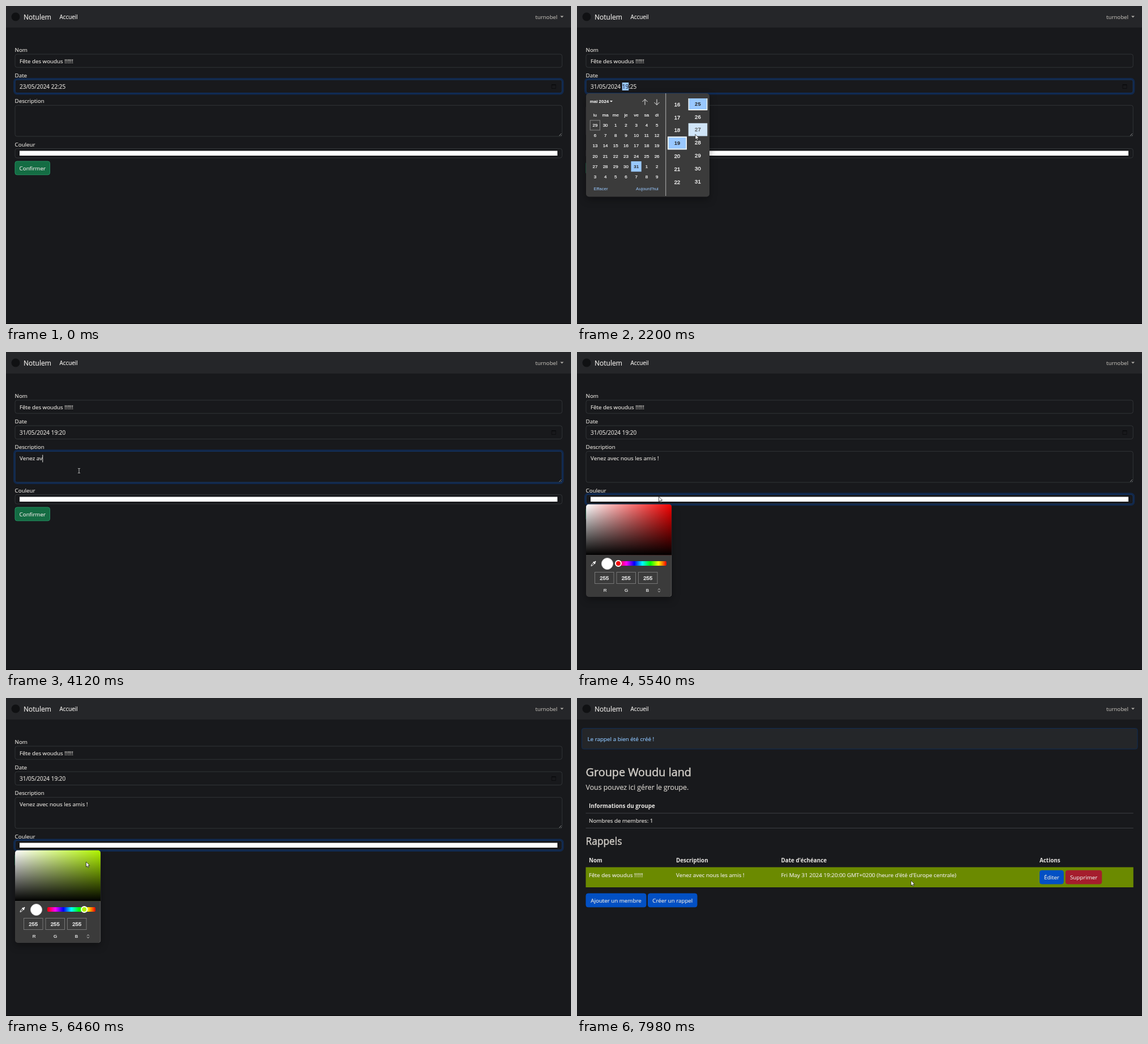
An HTML page that plays this animation: 998x561 px, repeating every 8000 ms.

```html
<!DOCTYPE html>
<html lang="fr">
<head>
<meta charset="utf-8">
<title>Rappels</title>
<style>
  html, body { margin: 0; width: 100%; height: 100%; overflow: hidden; background: #18191c; }
  /* Laid out on a grid four times finer, so that edges can fall between pixels */
  #stage { position: relative; width: 998px; height: 561px; overflow: hidden; background: #18191c;
    zoom: 4; transform: scale(.25); transform-origin: 0 0;
    color: #e2dfda; font: 9.75px/16px "Open Sans", "Noto Sans", sans-serif; -webkit-text-stroke: .18px; }
  #stage div, #stage svg { position: absolute; box-sizing: border-box; }
  .t { white-space: pre; }
  .c { transform: translateX(-50%); }
  .b { font-weight: 700; color: #e8e6e3; -webkit-text-stroke: 0; }
  .h { color: #d0ccc6; -webkit-text-stroke: .5px; }
  .field { border: 1px solid #313437; border-radius: 4px; }
  .ring { border: 1px solid #0d3268; border-radius: 4px; box-shadow: 0 0 0 2.5px #11284c; opacity: 0; }
  .btn { border-radius: 4px; text-align: center; line-height: 22.7px; color: #e8e6e3; }
  .pop { background: #3b3b3b; border-radius: 5px; box-shadow: 0 5px 14px rgba(0,0,0,.35);
    color: #fff; font-family: "Liberation Sans", Arial, sans-serif; }
  .pop .cell { width: 18.2px; height: 18.2px; line-height: 18.2px; text-align: center; font-size: 8px; }
  .col { overflow: hidden; width: 34px; height: 165px; }
  .col .item { width: 34px; height: 22.8px; line-height: 22.8px; text-align: center; font-size: 9.5px;
    -webkit-text-stroke: .3px; }
  .pop .over { background: #d0e5f8; color: #555; }
  .pop .on { background: #99c8ff; color: #262626; font-weight: 700; -webkit-text-stroke: 0; }
  .col .on { border: 1.5px solid #fff; line-height: 19.8px; }
  .link { color: #99c8ff; -webkit-text-stroke: 0; }
  .num { border: 1px solid #777; width: 34.5px; height: 21px; line-height: 19px; text-align: center;
    font-size: 9.5px; -webkit-text-stroke: .3px; }
  #hour { display: inline-block; line-height: 14px; }
  #hour.mark { background: #99c8ff; color: #26303c; }
  #caret { position: absolute; top: 2px; width: 1px; height: 13px; background: #e8e6e3; }
</style>
</head>
<body>
<div id="stage"></div>
<script>
const LOOP = 8000, ROW = 22.8, CELL = 18.2;
const PICK = [134, 173, 0];
const pad = n => String(n).padStart(2, '0');
const $ = id => document.getElementById(id);

// Markup helpers: a box, a line of text centred on y, a button and a form field
const box = (x, y, w, h, css = '', cls = '', body = '', id = '') =>
  `<div ${id && `id="${id}"`} class="${cls}" style="left:${x}px;top:${y}px;width:${w}px;height:${h}px;${css}">${body}</div>`;
const text = (x, y, s, size = 9.75, cls = '', css = '') =>
  `<div class="t ${cls}" style="left:${x}px;top:${y - 8}px;font-size:${size}px;${css}">${s}</div>`;
const btn = (x, y, w, s, bg, edge = bg) =>
  box(x, y, w, 24.7, `background:${bg};border:1px solid ${edge}`, 'btn', s);
const area = (name, y, h) =>
  box(15.6, y, 967.2, h, '', 'field') + box(15.6, y, 967.2, h, '', 'ring', '', name + 'Ring');

const nav = box(0, 0, 998, 38, 'background:#252629') +
  box(9.5, 11.5, 15, 15, 'background:#101113;border-radius:50%') +
  text(31, 19, 'Notulem', 12, '', 'color:#f0eeeb') + text(94.5, 19, 'Accueil', 9.9, '', 'color:#f0eeeb') +
  text(935, 19, 'turnobel', 9.7, '', 'color:#b0ada8') +
  box(979, 17.5, 0, 0, 'border:3px solid transparent;border-top-color:#b0ada8;border-bottom:0');

const form = text(15.6, 77, 'Nom') + area('name', 84.4, 24.4) + text(24, 97, 'Fête des woudus !!!!!!') +
  text(15.6, 122, 'Date') + area('date', 129.5, 24.5) +
  text(24, 142, '<span id="day"></span>/05/2024 <span id="hour"></span>:<span id="min"></span>', 10) +
  box(963.5, 138, 8, 8, 'border:1px solid #0c0d0f;border-top-width:2px;border-radius:1px') +
  text(15.6, 167, 'Description') + area('desc', 174.8, 55.6) +
  text(24, 187.5, '<span id="typed"></span><span id="caret"></span>', 9.85) +
  `<svg style="left:975px;top:223px" width="7" height="7"><path d="M2 6L6 2M5 6L6 5" stroke="#aaa" stroke-width=".8"/></svg>` +
  text(15.6, 244, 'Couleur') + area('color', 251, 17.5) +
  box(24, 255.5, 950, 8.5, '', '', '', 'bar') + btn(15.6, 273.5, 62.3, 'Confirmer', '#146c43', '#239262');

const arrow = (x, flip) => `<svg style="left:${x}px;top:9.5px${flip ? ';transform:scaleY(-1)' : ''}" width="11" height="12">
  <path d="M5.5 11V1M1 5.5L5.5 1L10 5.5" fill="none" stroke="#eee"/></svg>`;

const days = Array.from({ length: 42 }, (_, i) => ({
  n: i < 2 ? 29 + i : i < 33 ? i - 1 : i - 32,
  x: 6.8 + i % 7 * CELL, y: 47.2 + Math.floor(i / 7) * CELL
}));
const dayCells = ['lu', 'ma', 'me', 'je', 've', 'sa', 'di']
  .map((d, i) => box(6.8 + i * CELL, 29, CELL, CELL, '', 'cell', d)).join('') +
  days.map((d, i) => box(d.x, d.y, CELL, CELL, i ? '' : 'outline:1px solid #858585;outline-offset:-1px', 'cell day', d.n)).join('');
const column = (id, x, from, to, wrap) => box(x, 9, 34, 165, '', 'col',
  Array.from({ length: to - from }, (_, i) => `<div class="item">${pad((from + i) % wrap)}</div>`).join(''), id);

const calendar = box(16, 154, 218, 182.5, '', 'pop',
  text(6.8, 14, 'mai 2024', 7.9, '', 'font-weight:700;-webkit-text-stroke:0') +
  box(42, 13, 0, 0, 'border:2.5px solid transparent;border-top-color:#fff;border-bottom:0') +
  arrow(98.5) + arrow(119.5, true) + dayCells +
  text(26, 168, 'Effacer', 8, 'c link') + text(108, 168, "Aujourd'hui", 8, 'c link') +
  box(140.3, 0, 1, 181, 'background:#b5b5b5') +
  column('hours', 144, 12, 32, 24) + column('mins', 180.4, 12, 42, 60));

const hueBar = 'linear-gradient(90deg,#f00,#f0f,#00f,#0ff,#0f0,#ff0,#f00)';
const picker = box(16, 268.5, 151.5, 163.5, 'border-right:1px solid #666', 'pop',
  box(0, 0, 151, 90, 'border-radius:5px 5px 0 0', '', '', 'shade') +
  `<svg style="left:8px;top:99px" width="11" height="11"><path d="M1 10L1.6 7.6 6 3.2 7.6 4.8 3.2 9.2Z" fill="none" stroke="#fff"/>
   <path d="M4.8 2.8L8 6M6.6 4.2L9 1.8" stroke="#fff" stroke-width="2"/></svg>` +
  box(27, 94.5, 21, 21, 'border-radius:50%;border:1px solid #ddd', '', '', 'swatch') +
  box(57, 100.5, 85, 8, `border-radius:2px;background:${hueBar}`) +
  box(0, 98.5, 12, 12, 'border-radius:50%;border:2px solid #fff', '', '', 'knob') +
  ['R', 'G', 'B'].map((c, i) => box(15 + i * 38.5, 119.5, 34.5, 21, '', 'num') +
    text(33.7 + i * 37.4, 151.5, c, 8, 'c')).join('') +
  `<svg style="left:126px;top:148px" width="6" height="8"><path d="M1.2 3L3 1L4.8 3M1.2 5L3 7L4.8 5" fill="none" stroke="#ddd" stroke-width=".9"/></svg>`);

const group = box(8, 53, 982.5, 37.5, 'background:#242629;border:1px solid #0f2c54;border-radius:4px') +
  text(18.5, 72, 'Le rappel a bien été créé !', 9.85, '', 'color:#8cc2fa') +
  text(15.6, 130, 'Groupe Woudu land', 19.8, 'h') + text(15.6, 157, 'Vous pouvez ici gérer le groupe.', 12.3, '', 'color:#d6d2cc') +
  text(21, 190, 'Informations du groupe', 9.85, 'b') + box(15.6, 202.7, 967.2, .75, 'background:#4a4d50') +
  text(21, 216.5, 'Nombres de membres: 1', 9.8) + box(15.6, 229.2, 967.2, .75, 'background:#4a4d50') +
  text(15.6, 252, 'Rappels', 17.3, 'h') +
  [[21, 'Nom'], [175, 'Description'], [360.5, "Date d'échéance"], [817, 'Actions']]
    .map(([x, s]) => text(x, 286, s, 9.85, 'b')).join('') +
  box(15.6, 298.4, 967.2, 35.6, 'background:#6b8a00') +
  [[21, 'Fête des woudus !!!!!!'], [175, 'Venez avec nous les amis !'],
    [360.5, "Fri May 31 2024 19:20:00 GMT+0200 (heure d'été d'Europe centrale)"]]
    .map(([x, s]) => text(x, 312.3, s, 9.85, '', 'color:#edebe7')).join('') +
  btn(817, 303.8, 42.7, 'Éditer', '#0250c4') + btn(862.8, 303.8, 64.5, 'Supprimer', '#a51d2d') +
  btn(15.6, 344.5, 106.8, 'Ajouter un membre', '#0250c4') + btn(125, 344.5, 87.6, 'Créer un rappel', '#0250c4');

const cursors = `<svg id="arrow" width="10" height="13" style="overflow:visible"><path d="M0 0V9L2 7.2 3.4 10.3 4.8 9.7 3.5 6.7H6.4Z" fill="#fff" stroke="#111" stroke-width=".7"/></svg>
  <svg id="beam" width="10" height="10" style="overflow:visible"><path d="M-2-4H-.5L0-3.5.5-4H2M0-3.5V3.5M-2 4H-.5L0 3.5.5 4H2" fill="none" stroke="#ccc" stroke-width=".9"/></svg>`;

$('stage').innerHTML = nav + `<div id="form">${form}</div><div id="calBox">${calendar}</div><div id="pickBox">${picker}</div>` +
  `<div id="group">${group}</div>` + cursors + box(0, 560, 998, 1, 'background:#09090a');

const dayEls = [...document.querySelectorAll('.day')];
const numEls = [...document.querySelectorAll('.num')];

// Pointer path: time, x, y
const PATH = [
  [180, 960, 148], [280, 967, 142], [320, 967, 142], [840, 106, 284], [960, 106, 284],
  [1260, 172.5, 262.5], [1400, 172.5, 262.5], [1860, 175, 247], [2060, 175, 243],
  [2200, 209, 226.5], [2480, 211, 221], [2600, 211, 221], [2780, 262, 214], [2860, 262, 214],
  [3240, 129, 209.5], [5300, 129, 209.5], [5400, 144.5, 255], [5600, 144.5, 255],
  [5760, 73, 371], [5800, 73, 371], [6160, 138.3, 371], [6220, 138.3, 371],
  [6460, 141.5, 289], [6640, 166, 297], [6720, 166, 297], [6880, 186, 334], [6940, 186, 334],
  [7200, 52, 284], [7420, 52, 284], [7960, 590, 322]
];
// Typing bursts: start, end, characters
const PHRASE = 'Venez avec nous les amis !';
const BURSTS = [[3420, 3800, 5], [4000, 4255, 7], [4430, 4730, 10], [4910, 5130, 4]];

const clamp = (v, a = 0, b = 1) => Math.min(b, Math.max(a, v));
const ramp = (t, a, b) => { const k = clamp((t - a) / (b - a)); return k * k * (3 - 2 * k); };
const mix = (a, b, k) => a + (b - a) * k;
const show = (id, on) => { $(id).style.display = on ? '' : 'none'; };

function pointer(t) {
  const i = PATH.findIndex(p => p[0] > t);
  if (i < 1) return i ? PATH[PATH.length - 1].slice(1) : [-50, -50];
  const [a, b] = [PATH[i - 1], PATH[i]], k = ramp(t, a[0], b[0]);
  return [mix(a[1], b[1], k), mix(a[2], b[2], k)];
}

function typing(t) {
  let n = 0, last = 2800;
  for (const [a, b, count] of BURSTS) {
    if (t < a) break;
    const step = (b - a) / (count - 1), k = Math.min(count - 1, Math.floor((t - a) / step));
    n += k + 1;
    last = a + k * step;
  }
  return { n, last };
}

function scrollColumn(id, left, from, top, chosen, gapAt, [px, py]) {
  [...$(id).children].forEach((el, i) => {
    const v = from + i, y = -1.8 + (v - top) * ROW + (v >= gapAt ? 12.5 : 0);
    el.style.top = y + 'px';
    const on = v === chosen;
    const over = px >= left && px < left + 34 && py - 163 >= y && py - 163 < y + ROW;
    el.className = 'item' + (on ? ' on' : over ? ' over' : '');
  });
}

function draw(t) {
  const p = pointer(t);
  const calOpen = t >= 300 && t < 2800, pickOpen = t >= 5420 && t < 6880, done = t >= 7440;
  const day = t < 880 ? 23 : 31, hour = t < 2000 ? 22 : 19, min = t < 2540 ? 25 : 20;
  show('form', !done);
  show('group', done);
  show('calBox', calOpen);
  show('pickBox', pickOpen);

  $('day').textContent = day;
  $('hour').textContent = hour;
  $('hour').className = calOpen ? 'mark' : '';
  $('min').textContent = min;
  $('dateRing').style.opacity = 1 - ramp(t, 2800, 2950);
  $('descRing').style.opacity = ramp(t, 2800, 2950) - ramp(t, 5390, 5530);
  $('colorRing').style.opacity = ramp(t, 5390, 5530) - ramp(t, 7180, 7260);

  const { n, last } = typing(t);
  $('typed').textContent = PHRASE.slice(0, n);
  show('caret', t >= 2800 && t < 5390 && (t - last) % 1000 < 500);

  if (calOpen) {
    const hourTop = 22 - 3 * ramp(t, 1400, 1600) - 3.04 * ramp(t, 1640, 1860);
    scrollColumn('hours', 160, 12, hourTop, hour, 25, p);
    scrollColumn('mins', 196.4, 12, 25 - 7 * ramp(t, 2240, 2460), min, 99, p);
    days.forEach((d, i) => {
      const dx = p[0] - 16 - d.x, dy = p[1] - 154 - d.y;
      const over = dx >= 0 && dx < CELL && dy >= 0 && dy < CELL;
      dayEls[i].className = 'cell day' + (i === day + 1 ? ' on' : over ? ' over' : '');
    });
  }

  const rgb = t < 6660 ? [255, 255, 255] : PICK, fill = `rgb(${rgb})`;
  $('bar').style.background = fill;
  if (pickOpen) {
    const x = t < 5780 ? 73 : t < 6180 ? clamp(p[0], 73, 156) : 138.3;
    const hue = `hsl(${360 * (1 - (x - 73) / 83)},100%,48%)`;
    $('knob').style.left = x - 22 + 'px';
    $('knob').style.background = hue;
    $('shade').style.background = `linear-gradient(transparent,#000),linear-gradient(90deg,#fff,${hue})`;
    $('swatch').style.background = fill;
    numEls.forEach((el, i) => { el.textContent = rgb[i]; });
  }

  const beam = t >= 2760 && t < 5350;
  show('beam', beam);
  show('arrow', !beam);
  $(beam ? 'beam' : 'arrow').style.transform = `translate(${p[0]}px,${p[1]}px)`;
}

const start = performance.now();
function tick() {
  draw((performance.now() - start) % LOOP);
  requestAnimationFrame(tick);
}
tick();
</script>
</body>
</html>
```
